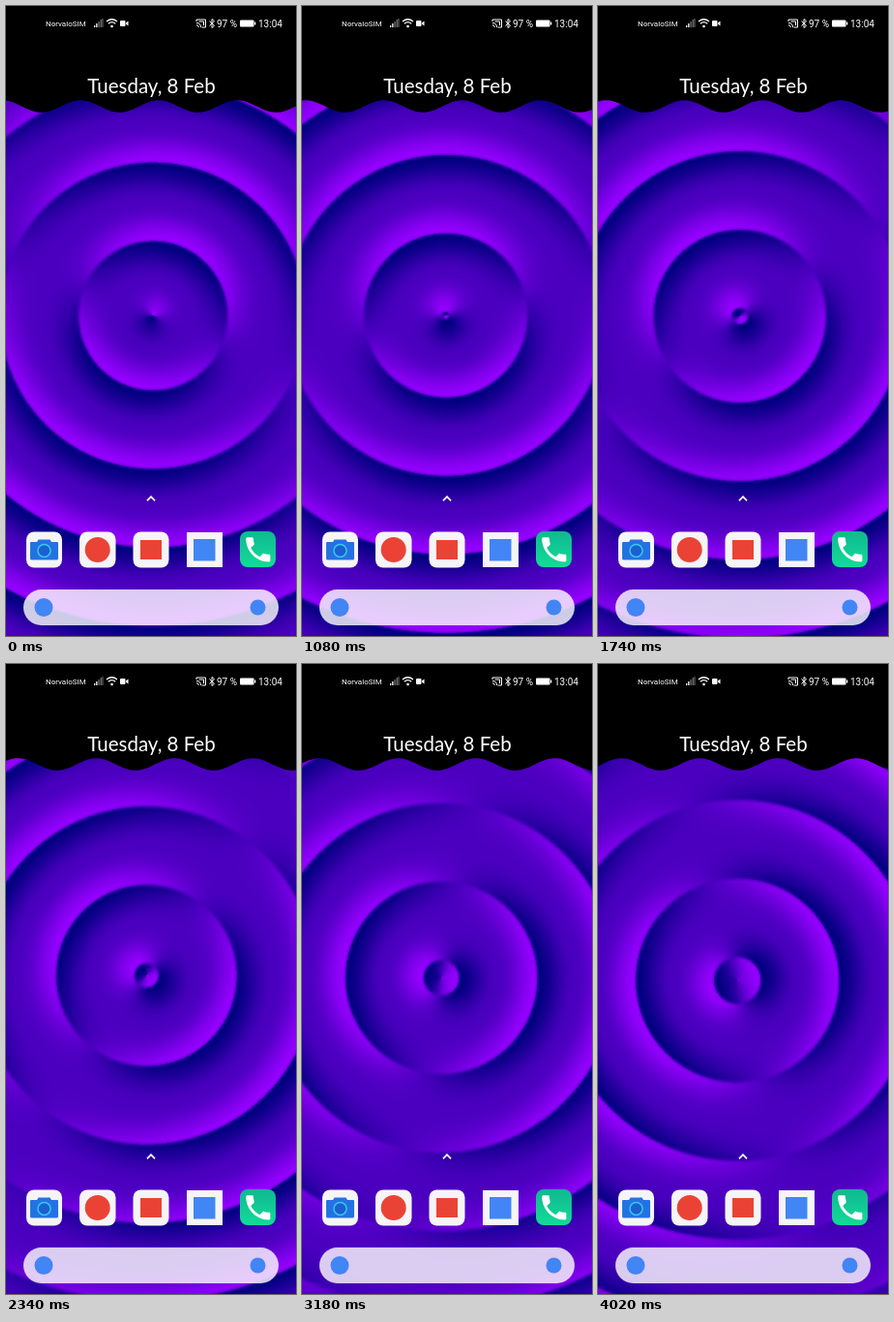
Animation of 300 by 650 pixels, one loop 4080 ms. Source, as an HTML page with a canvas:

```html
<!DOCTYPE html>
<html lang="en">
<head>
<meta charset="utf-8">
<style>
  html, body { margin: 0; width: 100%; height: 100%; overflow: hidden; background: #000; }
  canvas, svg { position: absolute; left: 0; top: 0; }
  text { fill: #fff; font-family: Roboto, sans-serif; }
  .line { fill: none; stroke: #fff; }
</style>
</head>
<body>
<canvas id="wall" width="300" height="650"></canvas>
<svg width="300" height="650" viewBox="0 0 300 650">
  <defs>
    <linearGradient id="green" x1="0" y1="0" x2="0" y2="1">
      <stop offset="0" stop-color="#10b890"/>
      <stop offset="1" stop-color="#12dc98"/>
    </linearGradient>
  </defs>

  <!-- status bar -->
  <text x="41" y="21" font-size="8">NorvaloSIM</text>
  <g fill="#fff">
    <path d="M91 20h1.300v2h-1.300zM93.200 18h1.300v4h-1.300z"/>
    <path d="M95.400 16h1.300v6h-1.300zM97.600 14h1.300v8h-1.300zM99.500 13h1v9h-1z" opacity=".45"/>
    <circle cx="109.500" cy="21" r="1.300"/>
    <rect x="118" y="15" width="5.500" height="6" rx="1"/>
    <path d="M124 17.500l2.500-2v5l-2.500-2z"/>
    <rect x="242" y="14.500" width="14.500" height="7" rx="1"/>
    <rect x="257" y="16.500" width="1.300" height="3"/>
  </g>
  <g class="line">
    <path d="M104 16q5.500-4.500 11 0M105.800 18.200q3.700-3 7.400 0" stroke-width="1.300"/>
    <path d="M197 16v-2h9.500v8h-4M197 17.500q4.500 0 4.500 4.500M197 19.700q2.300 0 2.300 2.300M199.500 16h5v4" stroke-width="1"/>
    <path d="M210.500 15.500l5 4.800-2.500 2.200v-9l2.500 2.200-5 4.800" stroke-width="1"/>
  </g>
  <text x="218" y="22" font-size="10">97 %</text>
  <text x="261" y="22" font-size="10">13:04</text>

  <text x="150.500" y="90" font-size="20.500" text-anchor="middle" style="font-family: Lato, sans-serif">Tuesday, 8 Feb</text>
  <path class="line" d="M146 510.300l4-4 4 4" stroke-width="1.800"/>

  <!-- dock -->
  <g fill="#f5f5f7">
    <rect x="21" y="542.500" width="37" height="37" rx="8"/>
    <rect x="76" y="542.500" width="37.500" height="37" rx="8"/>
    <rect x="131.500" y="542.500" width="37" height="37" rx="8"/>
    <rect x="187" y="543" width="37" height="36"/>
    <rect x="242" y="542" width="37" height="37" rx="8" fill="url(#green)"/>
  </g>
  <path d="M26 553h6l1.500-2.500h12l1.500 2.500h6q1 0 1 1v16q0 1.500-1.500 1.500h-26q-1.500 0-1.500-1.500v-16q0-1 1-1z" fill="#2471e3"/>
  <circle cx="39.500" cy="562" r="6.500" fill="#1c5fd0" stroke="#35c9e8" stroke-width="1.500"/>
  <circle cx="94.700" cy="561" r="13" fill="#ea4335"/>
  <rect x="139" y="551" width="22" height="20" fill="#ea4335"/>
  <rect x="194" y="550" width="22.500" height="22.500" fill="#4285f4"/>
  <path transform="translate(244 544) scale(1.400)" fill="#fff" d="M6.600 10.800c1.400 2.800 3.800 5.100 6.600 6.600l2.200-2.200c.3-.3.7-.4 1-.2 1.100.4 2.300.6 3.600.6.6 0 1 .4 1 1V20c0 .6-.4 1-1 1C10.600 21 3 13.400 3 4c0-.6.5-1 1-1h3.500c.6 0 1 .4 1 1 0 1.200.2 2.400.6 3.600.1.4 0 .7-.2 1z"/>

  <!-- search bar -->
  <rect x="18" y="602" width="264" height="37" rx="18.500" fill="#fff" opacity=".8"/>
  <circle cx="39" cy="620.500" r="9.500" fill="#4285f4"/>
  <circle cx="260.500" cy="620.500" r="8" fill="#4285f4"/>
</svg>
<script>
const W = 300, H = 650, TOP = 96, LOOP = 4080, STEP = 60;
const GAP = 81; // distance between ridges
const ctx = document.getElementById('wall').getContext('2d');
const image = ctx.createImageData(W, H - TOP);
const px = image.data.fill(255);

// Slope of the relief: steep beside each ridge, flat halfway between two.
function slope(r, ridge) {
  const d = (((r - ridge) % GAP) + GAP) % GAP;
  const k = 1 - 2 * d / GAP;
  const soft = Math.min(1, (Math.min(d, GAP - d) + 0.5) / 3.5);
  return k * Math.abs(k) ** 0.8 * soft;
}

function drawRings(ridge, angle) {
  const lx = Math.cos(angle), ly = Math.sin(angle);
  const cx = W / 2 + 6 * lx, cy = H / 2 + 6 * ly;
  let i = 0;
  for (let y = TOP; y < H; y++) {
    for (let x = 0; x < W; x++, i += 4) {
      const dx = x + 0.5 - cx, dy = y + 0.5 - cy;
      const r = Math.hypot(dx, dy) || 1;
      const facing = (dx * lx + dy * ly) / r;
      const light = Math.tanh(1.6 * facing * slope(r, ridge)) / 0.92;
      px[i] = 75 + 77 * light;
      px[i + 1] = 0;
      px[i + 2] = 191 + 66 * light;
    }
  }
  ctx.putImageData(image, 0, TOP);
}

function drawHeader(ridge) {
  ctx.fillStyle = '#000';
  ctx.beginPath();
  ctx.moveTo(0, 0);
  for (let x = 0; x <= W; x += 2) {
    ctx.lineTo(x, 103.5 - 6.3 * Math.cos(2 * Math.PI * (x - ridge) / GAP));
  }
  ctx.lineTo(W, 0);
  ctx.fill();
}

const start = performance.now();
let shown = -1;
function frame() {
  const time = (performance.now() - start) % LOOP;
  const step = Math.floor(time / STEP);
  if (step !== shown) {
    shown = step;
    const t = step * STEP / 1000;
    const ridge = 77 + 7 * t;
    drawRings(ridge, (-68.5 - 31.4 * t) * Math.PI / 180);
    drawHeader(ridge);
  }
  requestAnimationFrame(frame);
}
frame();
</script>
</body>
</html>
```
